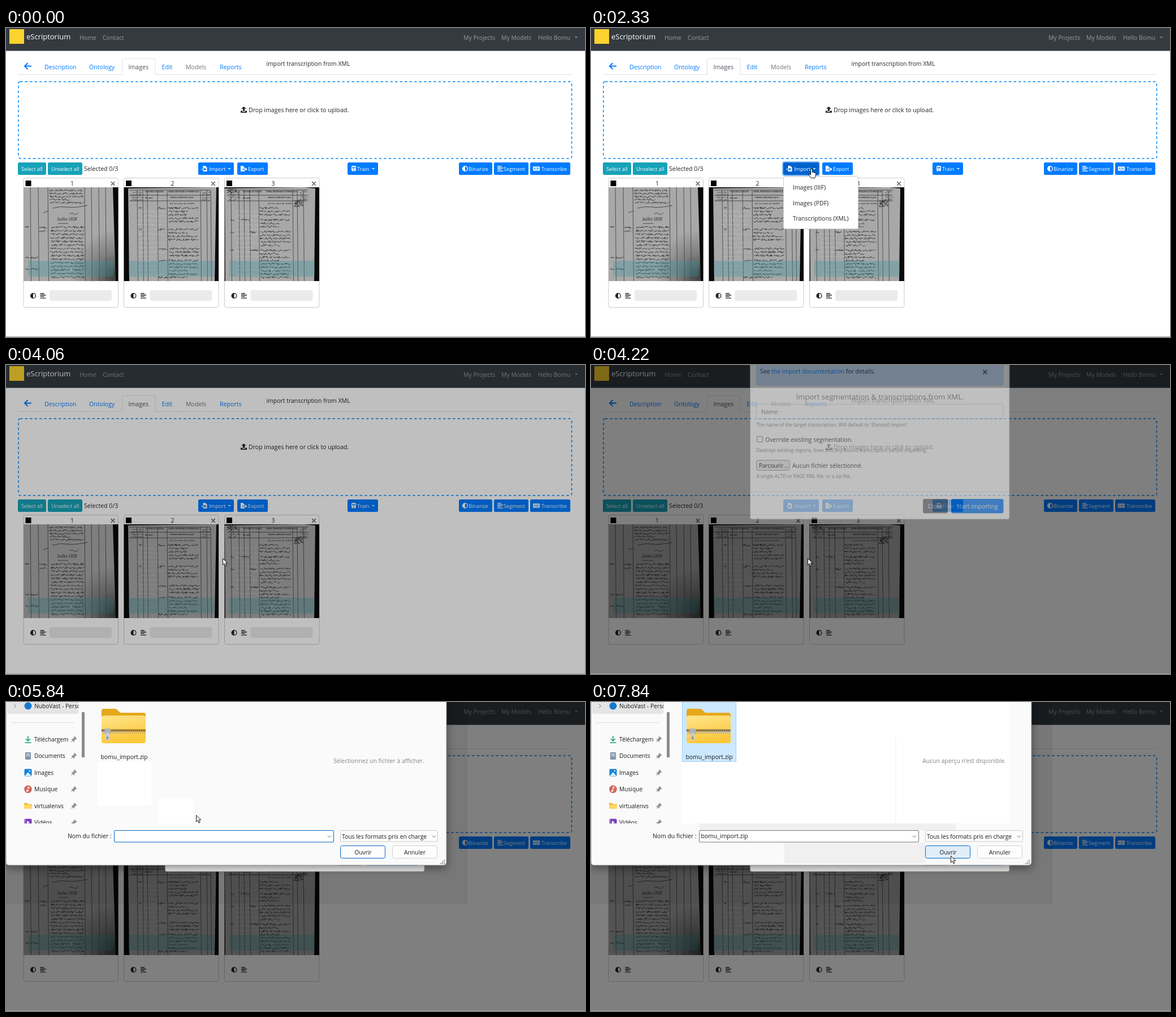
Recreate the animation shown at these times as an HTML page. Size 1024 by 547 pixels, loop 8 s.

```html
<!DOCTYPE html>
<html lang="en">
<head>
<meta charset="utf-8">
<title>Import transcription</title>
<style>
  html, body { margin: 0; width: 100%; height: 100%; overflow: hidden; background: #fff; }
  svg { display: block; width: 100%; height: 100%; font-family: "Open Sans", "Noto Sans", sans-serif; }
  text { white-space: pre; }
  .serif { font-family: "Liberation Serif", serif; }
  #importButton { paint-order: stroke; stroke-width: 4; }
</style>
</head>
<body>
<svg id="stage" viewBox="0 0 1024 547"></svg>
<script>
const BLUE = '#007bff', TEAL = '#17a2b8', INK = '#212529', MUTED = '#6c757d', PAPER = '#a8a8a8';
const BODY = 10.45, SMALL = 9.25, HELP = 8.35;

const text = (x, y, s, fill = INK, size = BODY, extra = '') =>
  `<text x="${x}" y="${y}" fill="${fill}" font-size="${size}" ${extra}>${s}</text>`;
const centered = (x, y, s, fill, size) => text(x, y, s, fill, size, 'text-anchor="middle"');
const rect = (x, y, w, h, fill, rx = 0, extra = '') =>
  `<rect x="${x}" y="${y}" width="${w}" height="${h}" fill="${fill}" rx="${rx}" ${extra}/>`;
const box = (x, y, w, h, fill, stroke, rx = 3, extra = '') =>
  rect(x + .5, y + .5, w - 1, h - 1, fill, rx, `stroke="${stroke}" ${extra}`);
const path = (d, fill = 'none', stroke = 'none', width = 1, extra = '') =>
  `<path d="${d}" fill="${fill}" stroke="${stroke}" stroke-width="${width}" ${extra}/>`;
const line = (d, color, width = 1, extra = '') => path(d, 'none', color, width, extra);
const group = (id, content) => `<g id="${id}">${content}</g>`;
const at = (x, y, content) => `<g transform="translate(${x} ${y})">${content}</g>`;
const caret = (x, y, fill) => path(`M${x} ${y}h5l-2.5 2.6z`, fill);
const cross = (x, y, r, color) => line(`M${x - r} ${y - r}l${2 * r} ${2 * r}m0 ${-2 * r}l${-2 * r} ${2 * r}`, color, 1.8);
const chevron = (x, y) => line(`M${x - 3} ${y - 1.5}l3 3 3-3`, '#555', .9);

// Icons are drawn around their own centre.
const icons = {
  contrast: c => `<circle r="4.4" fill="none" stroke="${c}" stroke-width="1.3"/>` + path('M0-4.4a4.4 4.4 0 0 0 0 8.8z', c),
  lines: c => line('M-5-4h7M-5-1.3H5M-5 1.4h7M-5 4.1H5', c, 1.4),
  fileIn: c => path('M-2.5-5h4l3 3v7h-7z', c) + line('M-5.5 1h3', c, 1.4) + line('M-2.5 1h4M0-1.2L2.2 1 0 3.2', BLUE, 1.3),
  fileOut: c => path('M-5-5h4l3 3v7h-7z', c) + line('M-2 1h4', BLUE, 1.4) + line('M2 1h3.500M3.300-1.200L5.500 1 3.300 3.200', c, 1.3),
  train: c => rect(-4, -5, 8, 9, c, 2) + path('M-2.6-3h2.1v2.8h-2.1zM.5-3h2.1v2.8H.5z', BLUE) +
    `<circle cy="2" r="1" fill="${BLUE}"/>` + line('M-3 5.2l1.4-1.4M3 5.2L1.6 3.8', c),
  letters: c => rect(-6, -3.8, 12, 7.6, c, 1) + line('M0-3v6M-4.6 2l1.5-4 1.5 4M1.5-1h3M3-2v1q0 2-1.6 3M2-.5q1 2 2.5 2.5', BLUE, .8),
  upload: c => path('M-1.6 2v-4h-2.7L0-6l4.3 4H1.6v4zM-5.5 1.5h3v1.7h5V1.5h3V5h-11z', c),
};
const icon = (name, x, y, color) => at(x, y, icons[name](color));

function button(x, width, label, labelX, fill, iconName, id = '') {
  return rect(x, 238, width, 22, fill, 2.5, id && `id="${id}"`) +
    (iconName ? icon(iconName, x + 11, 249, '#fff') : '') + text(labelX, 252.6, label, '#fff', SMALL);
}

function seeded(seed) {
  return () => (seed = (seed * 16807) % 2147483647) / 2147483647;
}

// One line of illegible handwriting, word by word.
function scribble(random, x, y, width) {
  let d = '';
  for (const end = x + width; x < end; x += 1.6) {
    d += `M${x.toFixed(1)} ${y}`;
    const wordEnd = Math.min(end, x + 4 + random() * 11);
    while (x < wordEnd) {
      x += .6 + random() * .9;
      d += `L${x.toFixed(1)} ${(y + (random() - .6) * 3.6).toFixed(1)}`;
    }
  }
  return d;
}

function block(random, x, top, bottom, width, step) {
  let d = '';
  for (let y = top; y < bottom; y += step) d += scribble(random, x + random() * 2, y, width * (random() < .2 ? .6 : .95));
  return d;
}

const scans = [
  { x: 31, sheet: 'M31 282H189L194 448H31z', columns: [43, 57, 74, 139, 151, 164, 176],
    blocks: [[76, 288, 314, 62, 5.4], [78, 353, 447, 61, 6.3]],
    notes: [[34, 353, 6], [59, 354, 14], [59, 360, 13], [43, 407, 14], [43, 427, 14], [34, 407, 6], [34, 427, 6]] },
  { x: 208.5, sheet: 'M216 284L372 282 369 448H218z', columns: [232, 242, 250, 268, 285, 344, 355, 362], header: 218,
    blocks: [[286, 319, 346, 55, 6], [286, 357, 380, 55, 6], [287, 391, 405, 55, 6], [287, 412, 447, 54, 6]],
    notes: [[235, 319, 5], [269, 319, 13], [235, 357, 5], [269, 357, 12], [270, 392, 15], [270, 412, 15], [270, 442, 15]] },
  { x: 386.5, sheet: 'M387 284L527 282 547 284 545 448H388z', columns: [398, 412, 421, 431, 447, 507, 515, 526], header: 391,
    blocks: [[448, 319, 334, 56, 6], [448, 340, 354, 56, 6], [449, 361, 386, 56, 6], [449, 394, 447, 55, 6]],
    notes: [[397, 340, 6], [415, 340, 15], [397, 362, 6], [432, 362, 10], [397, 394, 6], [432, 394, 14]] },
];

function scan({ x, sheet, columns, blocks, notes, header }, index) {
  const random = seeded(911 + index * 77);
  const ink = blocks.map(b => block(random, ...b)).join('') + notes.map(n => scribble(random, ...n)).join('');
  const faint = header ? block(random, header + 14, 325, 445, 50, 8) : '';
  let out = rect(x, 282, 167.5, 166, '#080808') + path(sheet, index ? PAPER : 'url(#stain)');
  out += line(columns.map(c => `M${c} ${header ? 287 : 282}L${c + 1.5} 448`).join(''), '#3c3c3c', .8);
  out += line(faint, '#c4c4c4', .5) + line(ink, '#202020', .8);
  if (header) {
    const bold = 'class="serif" font-weight="bold"';
    out += line(`M${header} 287h143M${header} 296h143M${header} 306h143`, '#333', .8);
    out += text(header + 28, 291, 'NATURE ET DATES', '#222', 3.6, bold) + text(header + 69, 291, 'NOMS, PRENOMS ET DOMICILES', '#222', 3.4, bold);
    out += text(header + 28, 302, 'des actes', '#222', 3.6, bold) + text(header + 72, 301, 'situation, indication et prix', '#222', 3.6, bold);
    out += line(block(random, header + 3, 291, 306, 20, 4.5) + block(random, header + 128, 291, 306, 14, 4.5), '#333', .6);
    out += text(header + 72, 312, 'du 1er mois de Juillet', '#222', 5, 'class="serif" font-style="italic"');
  } else {
    out += text(90, 341, 'Juillet 1838', '#222', 7.5, 'class="serif" font-style="italic"');
    out += line('M82 319q14-4 26-2t36-3M112 329q5-3 8 0t8-2M66 327l9-3M92 346h18', '#222', .7);
  }
  if (index === 2) out += line(block(random, 390, 286, 293, 18, 2.5) + block(random, 509, 306, 318, 15, 2.6), '#222');
  return out + rect(x + 8.5, 412, 151, 28, '#36939d', 0, 'opacity=".32"') + rect(x + 82, 427, 4, 2, '#c9a3a3');
}

function card(data, index) {
  const x = data.x - .5;
  return box(x, 265, 168.5, 230, '#fff', '#ccc') + scan(data, index) +
    rect(x + 4, 270, 10, 10, '#000') + centered(x + 86.5, 278.5, index + 1) + cross(x + 158.5, 275.5, 3.3, '#777') +
    icon('contrast', x + 17.5, 474, INK) + icon('lines', x + 35, 474, INK);
}

const page =
  rect(0, 0, 1024, 547, '#fff') + rect(0, 0, 1024, 40.5, '#343a40') + rect(6, 2, 26, 26, '#fdd32f') +
  text(36, 20, 'eScriptorium', '#fff', 13) +
  [[130, 'Home'], [171, 'Contact'], [809, 'My Projects'], [876, 'My Models'], [941, 'Hello Bomu']]
    .map(([x, s]) => text(x, 20.5, s, '#9a9da0')).join('') +
  caret(1006, 15.5, '#9a9da0') +
  line('M21 82.5h184.5V57q0-3 3-3H261q3 0 3 3v25.5h737', '#dee2e6') +
  line('M45 67.5H33m5.5-5.5L33 67.5l5.5 5.5', BLUE, 2) +
  [[68, 'Description'], [147, 'Ontology'], [216.5, 'Images', '#495057'], [275.5, 'Edit'], [318, 'Models', MUTED], [378, 'Reports']]
    .map(([x, s, c = BLUE]) => text(x, 73, s, c, 10.6)).join('') +
  text(460.5, 67, 'import transcription from XML') +
  rect(22, 95, 978.5, 136, 'none', 3, 'stroke="#0087f7" stroke-width="1.5" stroke-dasharray="4.5 4"') +
  icon('upload', 420.5, 145, INK) + text(429, 149, 'Drop images here or click to upload.', INK, 10.55) +
  button(21, 50, 'Select all', 27, TEAL) + button(74, 61, 'Unselect all', 80, TEAL) + text(138, 253, 'Selected 0/3', INK, 10.6) +
  button(340, 63, 'Import', 359, BLUE, 'fileIn', 'importButton') + caret(392.5, 248, '#fff') +
  button(409, 54, 'Export', 428, BLUE, 'fileOut', 'exportButton') +
  button(604, 54, 'Train', 621, BLUE, 'train') + caret(647, 248, '#fff') +
  button(801, 59, 'Binarize', 818, BLUE, 'contrast') + button(863, 61, 'Segment', 880, BLUE, 'lines') +
  button(927, 71, 'Transcribe', 947, BLUE, 'letters') +
  scans.map(card).join('') +
  group('progressBars', scans.map(s => rect(s.x + 46, 464, 110, 19, '#ebebeb', 4)).join(''));

const menu = box(340, 262, 133, 94, '#fff', '#ccc') + rect(340.5, 0, 132, 27, BLUE, 0, 'id="menuHighlight"') +
  ['Images (IIIF)', 'Images (PDF)', 'Transcriptions (XML)']
    .map((s, i) => text(357, 286 + i * 27.5, s, INK, BODY, 'class="item"')).join('');

const modal =
  box(281, 12, 459.5, 288.5, '#fff', '#aaa') + box(292, 23, 437.5, 40.5, '#cce5ff', '#b8daff') +
  text(299, 42, `See <tspan fill="${BLUE}">the import documentation</tspan> for details.`, '#0b3560') + cross(697, 39.5, 3.5, '#555f69') +
  centered(511, 88, 'Import segmentation &amp; transcriptions from XML.', '#656b71', 13.15) +
  box(292, 96, 437.5, 27, '#fff', '#ced4da') + text(301, 114, 'Name', MUTED) +
  text(292.5, 136, "The name of the target transcription. Will default to '{format} Import'.", MUTED, HELP) +
  box(293, 153, 11, 11, '#fff', '#737380', 1.5) + text(308, 163, 'Override existing segmentation.') +
  text(292.5, 181, 'Destroys existing regions, lines and any bound transcription before importing.', MUTED, HELP) +
  box(292, 195, 59.5, 19, '#e9e9ed', '#8f8f9d', 3, 'id="browse"') + text(297, 209, 'Parcourir...', '#000', 10) +
  text(356, 209, 'Aucun fichier sélectionné.', INK, 10.4) +
  text(292.5, 227, 'A single ALTO or PAGE XML file, or a zip file.', MUTED, HELP) +
  rect(282, 251, 458, 1, '#e3e6e9') + rect(587, 264, 44, 25.5, MUTED, 3) + centered(609, 280.5, 'Close', '#fff') +
  rect(637, 264, 92.5, 25.5, BLUE, 3) + centered(683, 280.5, 'Start importing', '#fff');

const smallFolder = path('M-7-5h5l2 2h7v8H-7z', '#f2b632') + rect(-7, -2, 14, 7, '#ffd667', 1);
const places = [
  ['Téléchargem', line('M0-6v9m-4-4l4 4 4-4M-5.5 6h11', '#1a9d76', 1.5)],
  ['Documents', rect(-5, -6.5, 10, 13, '#8396aa', 1) + line('M-3-3h6M-3 0h2m1 0h3', '#fff', 1.3)],
  ['Images', rect(-6.5, -6.5, 13, 13, '#1683d8', 2) + path('M-6 6L0-1l6 7z', '#d8f0ff') + '<circle cx="3" cy="-3" r="1.2" fill="#fff"/>'],
  ['Musique', '<circle r="6.8" fill="#d0685c"/>' + line('M0 3v-7l3 1.5', '#fff', 1.2) + '<circle cx="-1.5" cy="3" r="1.6" fill="#fff"/>'],
  ['virtualenvs', smallFolder],
  ['Vidéos', rect(-6.5, -6.5, 13, 13, '#7a3fbd', 2) + path('M-2-3l5 3-5 3z', '#fff') + line('M-5-5v10', '#d7b9f4', 1.2, 'stroke-dasharray="2 1.5"')],
];
const pin = path('M1-5l4 4-2 .5-2.5 3-.5 2-4-4 2-.5 2.5-3zM-2.5 2.5L-5 5', '#8a949c', '#8a949c');

const navigation = rect(2, -6, 126.5, 27, '#e5e5e5', 3) + line('M14 3.5l3.5 3.5-3.5 3.5', '#777') +
  '<circle cx="39" cy="7" r="6.5" fill="#1479d1"/>' + text(50, 11, 'NuboVast - Perso', '#1b1b1b', 10.2) + rect(9, 36, 112, 1, '#dcdcdc') +
  places.map(([name, art], i) => {
    const y = 66 + i * 29.45;
    return at(39, y, art) + text(50, y + 4, name, '#1b1b1b', 10.2) + at(120, y, pin);
  }).join('');

const teeth = 'stroke-dasharray="2 1.5"';
const zipFolder = path('M169 16q0-4 4-4h20q3 0 5 3l4 4h41q4 0 4 4v20h-78z', '#e5a81c') +
  rect(169, 24, 78, 49, 'url(#folder)', 4) + rect(169, 48, 78, 8, '#d9a21f') +
  line('M169 50.5h78', '#666', 4, teeth) + line('M169 54h78', '#ddd', 3, teeth) +
  rect(174, 47, 11, 10, '#aeb3b7', 1.5) + rect(176, 54, 7, 14, '#c7cbce', 2) + rect(178, 61, 3, 5, '#8b8f92', 1);

const dialog =
  rect(0, 0, 816, 357, '#000', 0, 'opacity=".06"') +
  path('M0-4H779V283q0 6-6 6H6q-6 0-6-6z', '#fafafa', '#888', 1, 'style="filter:drop-shadow(0 5px 8px rgba(0,0,0,.4))"') +
  group('idleContent', rect(161, 107, 96, 76, '#fff') + rect(271, 170, 60, 45, '#fff') +
    centered(659.5, 107.5, 'Sélectionnez un fichier à afficher.', '#858585')) +
  group('chosenContent', rect(161, 0, 579, 215, '#fff') + rect(538.5, 64, 1, 151, '#ededed') + rect(192, 215, 453, 12, '#f0f0f0') +
    rect(342, 249, 249, 37, '#f0f0f0') + centered(660, 107.5, "Aucun aperçu n'est disponible.", '#858585', 10.4)) +
  `<g clip-path="url(#navClip)">${navigation}</g>` + rect(134, 18, 5, 80, '#8b8b8b') +
  box(161, -2, 96, 108, 'none', 'none', 0, 'id="tile"') + zipFolder + centered(209, 100.5, 'bomu_import.zip', '#1b1b1b') +
  text(109, 241, 'Nom du fichier :', '#1b1b1b', 10.4) + box(191, 227, 389, 21.5, '#fff', '#0067c0', 1, 'id="nameField"') + chevron(572, 238) +
  text(194.5, 241, 'bomu_import.zip', '#1b1b1b', BODY, 'id="fileName"') +
  box(591, 227, 173, 20.5, '#fdfdfd', '#ccc', 1) + text(594, 241.5, 'Tous les formats pris en charge', '#1b1b1b', 10.35) + chevron(757, 238) +
  box(591, 254, 80, 23, '#fdfdfd', '#0067c0', 3, 'id="openButton"') + centered(631.5, 269.5, 'Ouvrir', '#1b1b1b', 10.1) +
  box(683, 254, 80, 23, '#fdfdfd', '#d0d0d0') + centered(723, 269.5, 'Annuler', '#1b1b1b', 10.3) +
  line('M768 286h2m1 0h2m1 0h2m-5-3h2m1 0h2m-2-3h2', '#999', 1.8);

const arrow = path('M.5 .5V12l2.7-2.5 2 4.6 2-.9-2-4.4h3.6z', '#fff', '#000', .9);
const hand = path('M-1.5 9V1.5a1.4 1.4 0 0 1 2.8 0V6l5 1.3q1.6.4 1.4 2l-.8 4.2-1 3H-.5l-4.2-5.2q-.8-1.5.7-1.8 1 0 2.5 1.6z', '#fff', '#000', .9);

const stage = document.getElementById('stage');
stage.innerHTML = `<defs>
  <clipPath id="navClip">${rect(0, 0, 128.5, 215, '#000')}</clipPath>
  <radialGradient id="stain" cx="1" cy=".95" r=".5"><stop stop-color="#3c3c3c"/><stop offset=".5" stop-color="#808080"/><stop offset="1" stop-color="${PAPER}"/></radialGradient>
  <linearGradient id="folder" y2="1" x2=".3"><stop stop-color="#ffe58b"/><stop offset="1" stop-color="#fbc83c"/></linearGradient>
</defs>` + page + group('menu', menu) + rect(0, 0, 1024, 547, '#000', 0, 'id="backdrop"') + group('modal', modal) + group('dialog', dialog) +
  rect(0, 546, 1024, 1, '#a0a0a0') + group('cursor', group('arrow', arrow) + group('hand', hand));

const el = Object.fromEntries([...stage.querySelectorAll('[id]')].map(e => [e.id, e]));
const items = stage.querySelectorAll('.item');
const show = (element, visible) => { element.style.display = visible ? '' : 'none'; };
const set = (element, attributes) => { for (const name in attributes) element.setAttribute(name, attributes[name]); };

// start, end, steps, from x, from y, to x, to y
const moves = [
  [290, 1230, 7, 689, 493, 456, 246],
  [1380, 2050, 5, 444, 248, 390, 249],
  [2610, 2880, 3, 390, 256, 389, 283],
  [3290, 3930, 5, 388, 299, 383, 342],
  [4360, 5280, 8, 382, 342, 336, 200],
  [5840, 6660, 7, 336, 200, 232, 90],
  [6930, 7550, 6, 232, 90, 636, 272],
];
// time, opacity, vertical offset
const modalSteps = [[0, 0, -35], [4220, .5, -27], [4360, .92, -4], [4490, 1, 0]];
const latest = (list, t) => list.filter(entry => entry[0] <= t).pop();

function pointer(t) {
  const [start, end, steps, x0, y0, x1, y1] = latest(moves, t) || moves[0];
  const step = Math.max(0, Math.min(steps - 1, Math.floor((t - start) / (end - start) * (steps - 1) + .05)));
  const u = step / (steps - 1), eased = u * u * (3 - 2 * u);
  return [x0 + (x1 - x0) * eased, y0 + (y1 - y0) * eased];
}

function render(t) {
  const [x, y] = pointer(t);
  const isHand = t >= 1230 && t < 4060;
  show(el.cursor, t >= 290);
  show(el.hand, isHand);
  show(el.arrow, !isHand);
  set(el.cursor, { transform: `translate(${x} ${y})` });

  const open = t >= 2330 && t < 4060;
  const hovering = t >= 1380 && t < 2330;
  set(el.importButton, { fill: open ? '#0062cc' : hovering && x < 404 ? '#0069d9' : BLUE, stroke: open ? '#7fbdff' : 'none' });
  set(el.exportButton, { fill: hovering && x > 408 ? '#0069d9' : BLUE });
  show(el.menu, open);
  const row = t < 3290 ? -1 : y < 323 ? 1 : 2;
  show(el.menuHighlight, row > 0);
  set(el.menuHighlight, { y: 268 + row * 27.5 });
  items.forEach((item, i) => set(item, { fill: i === row ? '#fff' : INK }));

  const [, opacity, offset] = latest(modalSteps, t);
  set(el.backdrop, { opacity: t < 4060 ? 0 : t < 4220 ? .25 : .5 });
  show(el.progressBars, t < 4220);
  set(el.modal, { opacity, transform: `translate(0 ${offset})` });
  set(el.browse, { fill: t >= 4490 && y < 214 ? '#d0d0d7' : '#e9e9ed' });

  const chosen = t >= 6930;
  const overTile = x > 161 && x < 257 && y < 106;
  show(el.dialog, t >= 5840);
  show(el.idleContent, !chosen);
  show(el.chosenContent, chosen);
  show(el.fileName, chosen);
  set(el.tile, { fill: chosen ? '#cce8ff' : overTile ? '#e5f1fb' : 'none', stroke: chosen ? '#99d1ff' : 'none' });
  set(el.nameField, { stroke: chosen ? '#777' : '#0067c0' });
  set(el.openButton, { fill: chosen && x > 591 && y > 254 ? '#e0eef9' : '#fdfdfd' });
}

function frame() {
  render(performance.now() % 8000);
  requestAnimationFrame(frame);
}
frame();
</script>
</body>
</html>
```
